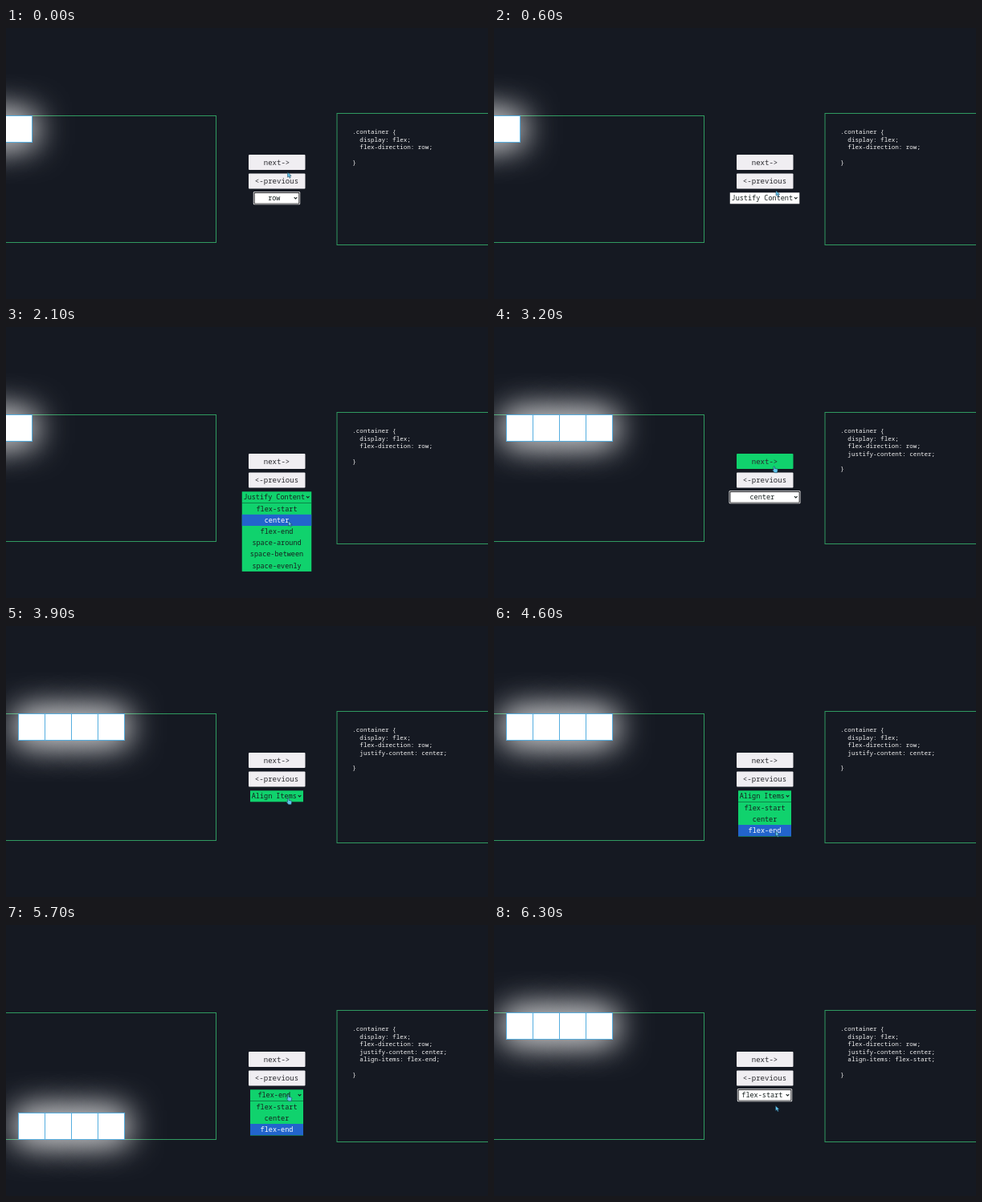
An HTML page for the animation above (6.5 s loop, 600x338 px).

```html
<!DOCTYPE html>
<html lang="en">
<head>
<meta charset="utf-8">
<title>Flexbox playground</title>
<style>
  html, body { margin: 0; width: 100%; height: 100%; overflow: hidden; background: #151922; }
  svg { display: block; width: 600px; height: 338px; }
  text { font: 500 8.5px 'Noto Sans Mono', 'DejaVu Sans Mono', monospace; fill: #17201f; text-anchor: middle; }
  .panel { fill: none; stroke: #309a60; }
  .btn { fill: #f0eef2; }
  .btn.hot, .list, .hot { fill: #10d26d; }
  .btn-label { font-size: 9.05px; font-weight: 400; fill: #2b2b30; }
  .code { font-size: 7.55px; fill: #f4f4f4; text-anchor: start; }
  .tile { fill: #fff; stroke: #55aee0; }
  .glow { fill: #fff; filter: url(#blur); }
  .picked { fill: #2264cc; }
  .picked-label { fill: #fff; }
  .pointer { fill: #62c3ea; stroke: #173549; stroke-width: .5; }
</style>
</head>
<body>
<svg viewBox="0 0 600 338">
  <defs>
    <filter id="blur" x="-3" y="-3" width="7" height="7"><feGaussianBlur stdDeviation="21"/></filter>
  </defs>
  <rect class="panel" x="-99.5" y="109.5" width="361" height="158"/>
  <rect class="panel" x="412" y="106.5" width="240" height="164"/>
  <g id="tiles"></g>
  <g id="code"></g>
  <g id="controls"></g>
  <g id="pointer"></g>
</svg>
<script>
const LOOP = 6500, STEP = 100, MID = 337;
const $ = id => document.getElementById(id);

// Pointer tip: time, x, y
const path = [
  [0, 350.5, 180], [200, 350, 172], [300, 350, 172], [500, 351, 190], [700, 351, 216],
  [1300, 351, 216], [2000, 351.5, 242], [2900, 351.5, 242], [3200, 348, 174],
  [3400, 348, 174], [3900, 350.5, 215], [4100, 350.5, 217], [4600, 350.5, 256],
  [4900, 350.5, 256], [5400, 350.5, 212], [5700, 350.5, 212], [6100, 350.5, 225.5], [6500, 350.5, 225.5]
];

const justify = ['flex-start', 'center', 'flex-end', 'space-around', 'space-between', 'space-evenly'];
const align = justify.slice(0, 3);
const menus = {
  direction: { width: 56, items: [] },
  justify: { width: 86.5, items: justify },
  align: { width: 66, items: align }
};

// Each entry changes the state from its time on
const events = [
  [0, { menu: 'direction', value: 'row', focus: true, open: false, dx: -115, dy: 0, rules: [] }],
  [300, { menu: 'justify', value: 'Justify Content', focus: false }],
  [900, { open: true, focus: true }],
  [2400, { open: false, value: 'center', dx: 0, rules: ['justify-content: center;'] }],
  [3300, { menu: 'align', value: 'Align Items', focus: false }],
  [4000, { open: true, focus: true }],
  [4900, { open: false, value: 'flex-end', dy: 125, rules: ['justify-content: center;', 'align-items: flex-end;'] }],
  [5500, { open: true }],
  [6100, { open: false, value: 'flex-start', dy: 0, rules: ['justify-content: center;', 'align-items: flex-start;'] }]
];

const stateAt = t => Object.assign({}, ...events.filter(e => e[0] <= t).map(e => e[1]));

function tipAt(t) {
  const i = path.findIndex(p => p[0] > t);
  const [a, b] = [path[i - 1], path[i]];
  const k = (t - a[0]) / (b[0] - a[0]);
  return [1, 2].map(n => a[n] + (b[n] - a[n]) * k);
}

const rect = (cls, x, y, w, h, extra = '') =>
  `<rect class="${cls}" x="${x}" y="${y}" width="${w}" height="${h}" ${extra}/>`;
const text = (cls, x, y, s) =>
  `<text class="${cls}" x="${x}" y="${y}">${s.replace(/</g, '&lt;').replace(/>/g, '&gt;')}</text>`;

function drawTiles(s) {
  const xs = [0, 1, 2, 3].map(i => 15.5 + 33 * i + s.dx), y = 109.5 + s.dy;
  return xs.map(x => rect('glow', x - 4, y - 4, 41, 41)).join('') +
    xs.map(x => rect('tile', x, y, 33, 33)).join('');
}

function drawCode(s) {
  const rules = ['display: flex;', 'flex-direction: row;', ...s.rules];
  const line = (str, i, indent) => text('code', 431.3 + indent * 4.53, 132.4 + i * 9.4, str);
  return line('.container {', 0, 0) + rules.map((r, i) => line(r, i + 1, 2)).join('') +
    line('}', rules.length + 2, 0);
}

function drawButton(label, y, tipY) {
  const hot = tipY > y && tipY < y + 19 ? 'hot' : '';
  return rect('btn ' + hot, 302, y, 70.5, 19, 'rx="1"') + text('btn-label', MID, y + 12.9, label);
}

function drawSelect(s, tipY) {
  const { width: w, items } = menus[s.menu];
  const x = MID - w / 2, hot = s.open || (tipY > 205 && tipY < 219.5);
  let out = '';
  if (s.focus && !s.open) {
    out += rect('', x - 1.2, 204.3, w + 2.4, 15.9, 'rx="1.2" style="fill:#fff"') +
      rect('', x - .4, 205.1, w + .8, 14.3, 'rx=".6" style="fill:#101014"');
  }
  const inset = s.focus && !s.open ? .6 : 0;
  out += rect(hot ? 'hot' : '', x + inset, 205.3 + inset, w - 2 * inset, 14 - 2 * inset, hot ? '' : 'style="fill:#fff"');
  out += text('', 333.8, 215.2, s.value);
  const cx = x + w - 4.5;
  out += `<path d="M${cx - 1.8} 211.2l1.8 1.8 1.8-1.8" fill="none" stroke="#17201f" stroke-width="1.1"/>`;
  if (!s.open) return out;

  const top = 220, row = 14.15;
  const over = Math.floor((tipY - top) / row);
  const picked = over >= 0 ? over : items.indexOf(s.value);
  out += rect('list', x, top - .6, w, row * items.length + .6) +
    rect('', x, 219, w, .7, 'style="fill:#0b7c45"');
  items.forEach((item, i) => {
    const y = top + i * row;
    if (i === picked) out += rect('picked', x, y - .9 + .6, w, row);
    out += text(i === picked ? 'picked-label' : '', MID, y + 9.8, item);
  });
  return out;
}

function drawPointer([x, y]) {
  const hand = (y > 158 && y < 177) || (y > 181.5 && y < 200.5) || (y > 205 && y < 219.5);
  const d = hand
    ? 'M0 0q1-.8 1.3.4l.2 2 3 .7q.9.4.7 1.4l-.7 3.2h-3.2l-2.6-3q-.1-1 1.3-.3z'
    : 'M0 0v6.2l1.5-1.3 1.1 2.4 1.2-.6-1.1-2.3h2z';
  return `<path class="pointer" transform="translate(${x} ${y})" d="${d}"/>`;
}

function draw(t) {
  const s = stateAt(t), tip = tipAt(t);
  $('tiles').innerHTML = drawTiles(s);
  $('code').innerHTML = drawCode(s);
  $('controls').innerHTML = drawButton('next->', 158, tip[1]) +
    drawButton('<-previous', 181.5, tip[1]) + drawSelect(s, tip[1]);
  $('pointer').innerHTML = drawPointer(tip);
}

const start = performance.now();
let last = -1;
function tick() {
  const t = Math.floor(((performance.now() - start) % LOOP) / STEP) * STEP;
  if (t !== last) draw(last = t);
  requestAnimationFrame(tick);
}
tick();
</script>
</body>
</html>
```
